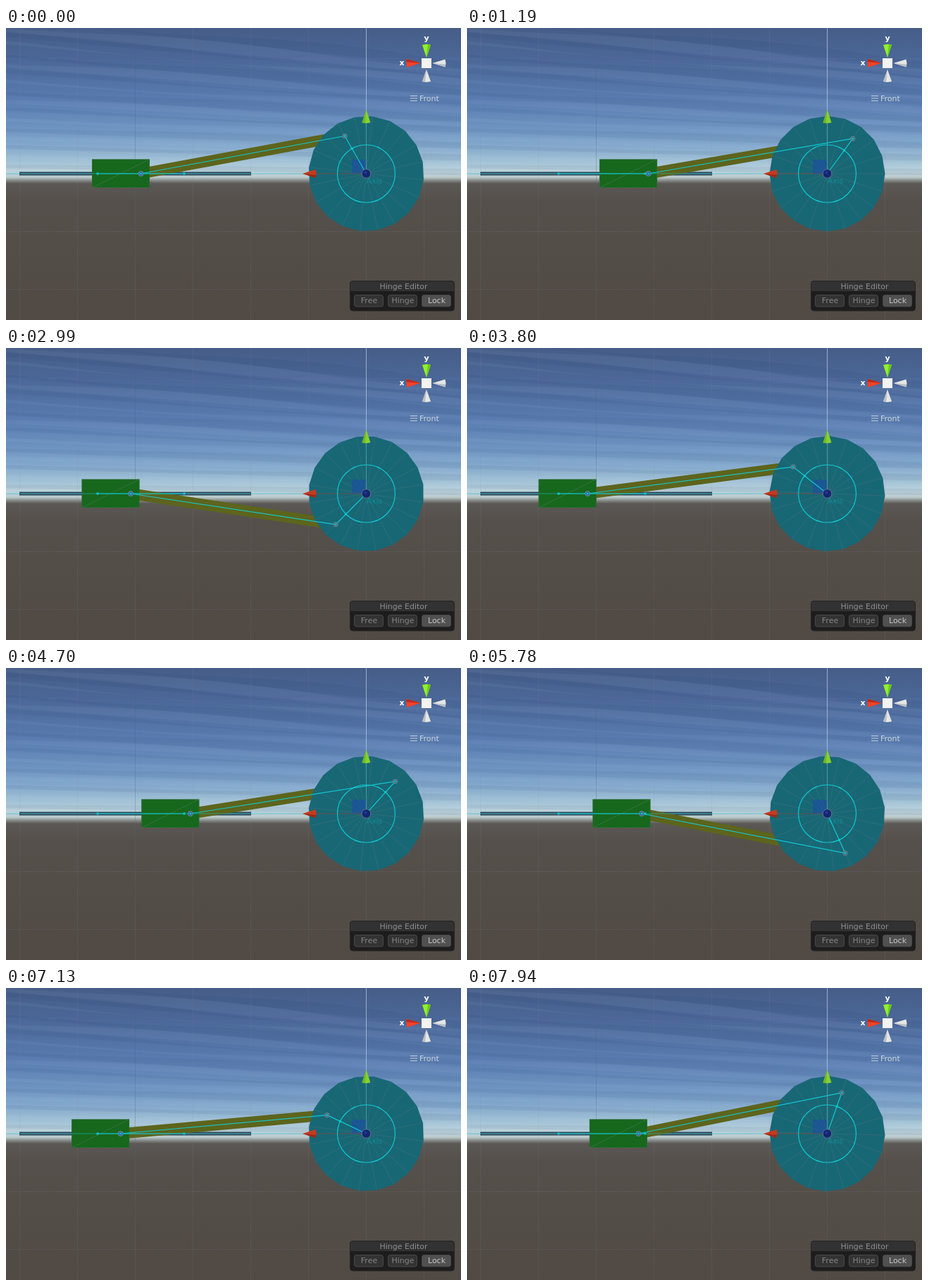
Write an HTML page with a canvas that moves like this. It is 646 px wide and 415 px high and loops after 8 s.

```html
<!DOCTYPE html>
<html>
<head>
<meta charset="utf-8">
<title>Crank and slider</title>
<style>
html, body { margin: 0; width: 100%; height: 100%; overflow: hidden; background: #514a44; }
canvas { display: block; }
</style>
</head>
<body>
<canvas id="stage" width="646" height="415"></canvas>
<script>
const W = 646, H = 415, LOOP = 8000, HOLD = 650, STEP = 90;
const CX = 511.5, CY = 207, WHEEL = 82, CRANK = 61.6, ROD = 294.4;
const CYAN = '#10c8cf';
const FONT = '11px "DejaVu Sans", sans-serif';
const g = document.getElementById('stage').getContext('2d');
const back = document.createElement('canvas');
back.width = W;
back.height = H;

function line(c, x1, y1, x2, y2, color, width = 1) {
  c.strokeStyle = color;
  c.lineWidth = width;
  c.beginPath();
  c.moveTo(x1, y1);
  c.lineTo(x2, y2);
  c.stroke();
}

function poly(c, points, color) {
  c.fillStyle = color;
  c.beginPath();
  points.forEach(p => c.lineTo(...p));
  c.closePath();
  c.fill();
}

function disc(x, y, r, fill, stroke) {
  g.beginPath();
  g.arc(x, y, r, 0, 7);
  g.fillStyle = fill;
  g.fill();
  g.strokeStyle = stroke;
  g.lineWidth = 1;
  g.stroke();
}

function text(c, s, x, y, color, align = 'center', font = FONT) {
  c.font = font;
  c.textAlign = align;
  c.fillStyle = color;
  c.fillText(s, x, y);
}

function box(c, x, y, w, h, r, fill, stroke) {
  c.beginPath();
  c.roundRect(x, y, w, h, r);
  c.fillStyle = fill;
  c.fill();
  if (stroke) {
    c.strokeStyle = stroke;
    c.lineWidth = 1;
    c.stroke();
  }
}

// Cone seen from the side; (dx, dy) points from the tip to the base.
function cone(c, x, y, dx, dy, len, half, light, dark) {
  const at = (a, b) => [x + dx * a - dy * b, y + dy * a + dx * b];
  poly(c, [at(0, 0), at(len, half), at(len + 1, 0), at(len, -half)], light);
  poly(c, [at(0, 0), at(len, half), at(len + 1, half / 3)], dark);
}

function paintBackground() {
  const c = back.getContext('2d');
  const fade = c.createLinearGradient(0, 0, 0, H);
  [[0, '#465d88'], [50, '#4c699a'], [100, '#597baf'], [140, '#6c92c0'],
   [170, '#86abcd'], [190, '#a3c2d6'], [205, '#bdd4dc'], [212, '#bccbcc'],
   [216, '#8d9492'], [221, '#5b5855'], [245, '#55504b'], [H, '#514a44']]
    .forEach(([y, color]) => c_stop(fade, y, color));
  c.fillStyle = fade;
  c.fillRect(0, 0, W, H);

  // Soft sloping streaks that flatten towards the horizon.
  for (let k = 0; k < 17; k++) {
    const y = 4 + k * 12, flat = 1 - y / 215;
    const edge = x => y + flat * (x * 0.1 - 22 + 5 * Math.sin(x / 95 + k * 1.7));
    const points = [];
    for (let x = 0; x <= W; x += 19) points.push([x, edge(x)]);
    points.push([W, edge(W) + 9], [0, edge(0) + 5]);
    poly(c, points, k % 2 ? 'rgba(190,215,245,.055)' : 'rgba(25,45,95,.065)');
  }

  for (let x = 19.5; x < W; x += 82) line(c, x, 0, x, H, 'rgba(130,140,160,.13)');
  for (let y = 43.5; y < H; y += 82) line(c, 0, y, W, y, 'rgba(130,140,160,.13)');
  line(c, 101, 43.5, 408, 43.5, 'rgba(60,80,120,.25)');
  line(c, 183.5, 0, 183.5, 290, 'rgba(60,80,120,.2)');
  line(c, CX, 0, CX, 126, 'rgba(195,215,235,.65)');

  // Rail
  c.fillStyle = '#2c4657';
  c.fillRect(19, 204.5, 329, 5);
  c.fillStyle = '#48697a';
  c.fillRect(20, 206, 327, 2);

  // View gizmo
  cone(c, 597, 42, 0, -1, 18, 6, '#91f02c', '#6cc81c');
  cone(c, 588.5, 50, -1, 0, 19, 6, '#f0422a', '#bd2917');
  cone(c, 605.5, 50, 1, 0, 18, 5.5, '#e6e6e6', '#b9bec4');
  cone(c, 597, 59, 0, 1, 17, 6, '#e6e6e6', '#b9bec4');
  c.fillStyle = '#f2f2f2';
  c.fillRect(590, 43, 14, 14);
  const bold = 'bold ' + FONT;
  text(c, 'y', 597, 18, '#fff', 'center', bold);
  text(c, 'x', 562, 53, '#fff', 'center', bold);
  for (let y = 96.5; y < 105; y += 3.5) line(c, 574, y, 584, y, '#c3cddb');
  text(c, 'Front', 587, 104, '#d0d8e4', 'left');

  // Panel
  box(c, 488.5, 359.5, 148, 42.5, 4, '#1d1d1d', '#242424');
  box(c, 489, 360, 147, 14, [4, 4, 0, 0], '#323232');
  text(c, 'Hinge Editor', 564.5, 371, '#8f8f8f');
  [['Free', 494.5, '#333', '#858585'], ['Hinge', 542.5, '#333', '#858585'],
   ['Lock', 590.5, '#505050', '#c8c8c8']].forEach(([name, x, fill, color]) => {
    box(c, x, 379.5, 41, 16.5, 3, fill, '#484848');
    text(c, name, x + 21, 391, color);
  });
}

function c_stop(fade, y, color) {
  fade.addColorStop(y / H, color);
}

function drawWheel(angle) {
  const rim = [];
  for (let i = 0; i < 20; i++) {
    const a = angle + i * Math.PI / 10;
    rim.push([CX + WHEEL * Math.cos(a), CY - WHEEL * Math.sin(a)]);
  }
  poly(g, rim, '#186775');
  rim.forEach(([x, y]) => line(g, CX, CY, x, y, 'rgba(105,120,130,.3)'));
}

function drawMoveHandle() {
  g.fillStyle = 'rgba(28,78,165,.62)';
  g.fillRect(491, 187, 20.5, 20);
  line(g, CX, 134, CX, CY, 'rgba(120,190,185,.6)');
  line(g, 440, CY, CX, CY, 'rgba(150,65,55,.65)');
  cone(g, CX, 116, 0, 1, 18.5, 6, '#86d030', '#72b428');
  cone(g, 421, CY, -(-1), 0, 18.5, 6, '#c53a20', '#9c2a17');
}

function draw(t) {
  const n = t < HOLD ? 0 : Math.floor((t - HOLD) / STEP) + 1;
  const turn = (119.7 - 9.38 * n) * Math.PI / 180;
  const angle = turn - 0.0122 * (0.9 - Math.sin(turn));
  const cos = Math.cos(angle), sin = Math.sin(angle);
  const px = CX + CRANK * cos, py = CY - CRANK * sin;
  const sx = px - Math.sqrt(ROD * ROD - (CRANK * sin) ** 2);

  g.drawImage(back, 0, 0);
  line(g, sx, CY, px, py, '#5d641c', 15.5);
  drawWheel(angle);

  // Slider block
  const left = sx - 69.5;
  g.fillStyle = '#17671d';
  g.fillRect(left, 186.5, 82, 40.5);
  line(g, left, 227, left + 82, 186.5, 'rgba(100,130,110,.4)');
  g.strokeStyle = 'rgba(60,110,75,.5)';
  g.strokeRect(left + .5, 187, 81, 39.5);

  text(g, 'Axis', 511.5, 220.5, '#118b93', 'left');
  drawMoveHandle();

  // Joint overlay
  line(g, 0, CY, 422, CY, 'rgba(20,195,203,.55)');
  line(g, 130, CY, 253, CY, CYAN, 1.2);
  g.strokeStyle = CYAN;
  g.lineWidth = 1.2;
  g.beginPath();
  g.arc(CX, CY, 41, 0, 7);
  g.stroke();
  line(g, sx, CY, px, py, CYAN, 1.2);
  line(g, px, py, CX, CY, CYAN, 1.2);
  [[130, CY], [253, CY], [CX + 41 * cos, CY - 41 * sin]].forEach(([x, y]) => {
    g.fillStyle = CYAN;
    g.fillRect(x - 1.5, y - 1.5, 3, 3);
  });
  disc(sx, CY, 3.5, 'rgba(45,115,175,.85)', 'rgba(125,145,165,.8)');
  disc(px, py, 3.2, 'rgba(60,125,145,.8)', 'rgba(135,130,145,.8)');
  g.fillStyle = CYAN;
  g.fillRect(sx - 1, CY - 1, 2, 2);
  g.fillRect(px - 1, py - 1, 2, 2);
  disc(CX, CY, 6.3, '#14276f', 'rgba(110,120,150,.85)');
  disc(CX - 1, CY - 1.5, 2, '#20399a', '#1a2f85');
}

paintBackground();
const start = performance.now();
(function frame() {
  draw((performance.now() - start) % LOOP);
  requestAnimationFrame(frame);
})();
</script>
</body>
</html>
```
